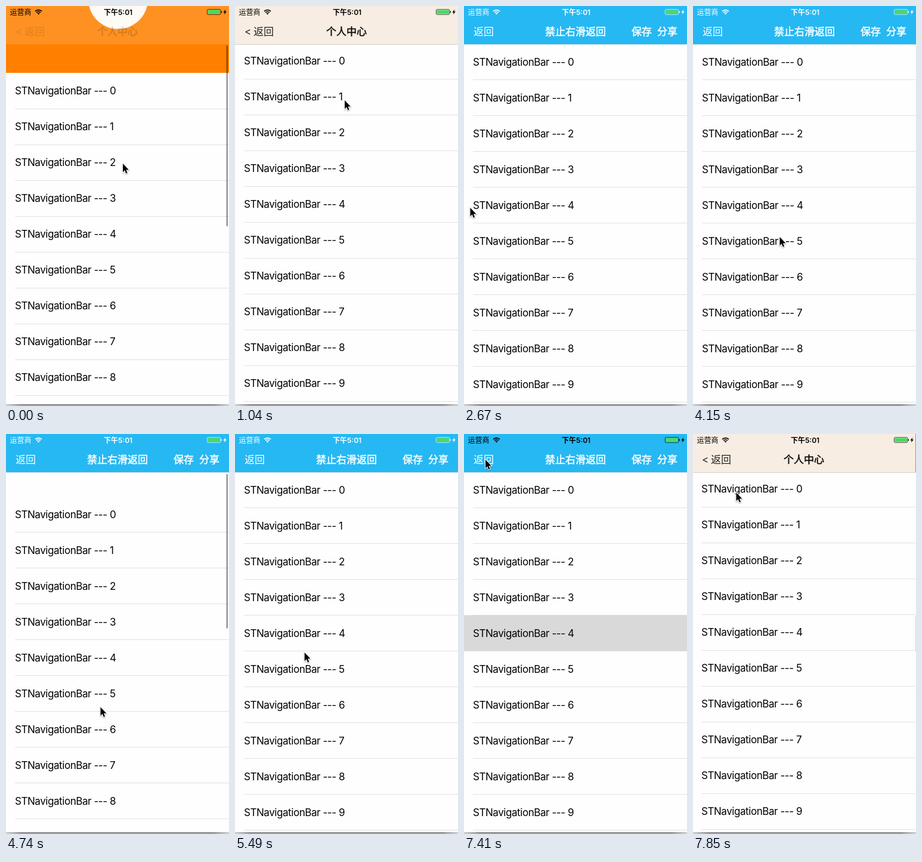
These frames come from a looping animation (374x670 px, 8 s). An HTML page with a canvas:

```html
<!DOCTYPE html>
<html lang="zh-CN">
<head>
<meta charset="utf-8">
<title>Navigation bar demo</title>
<style>
html, body { margin: 0; width: 100%; height: 100%; overflow: hidden; background: #fff; }
canvas { display: block; width: 374px; height: 670px; }
</style>
</head>
<body>
<canvas id="stage"></canvas>
<script>
const W = 374, H = 670, LOOP = 8000, STEPS = 54;
const ORANGE = '#ff8000', BEIGE = '#f7ede2', BLUE = '#26b8f3', PAPER = '#fefefe';
const PUSH = 8, POP = 50, TAP = 40;
const FAMILY = 'Inter, "Noto Sans CJK SC", "Noto Sans CJK", sans-serif';

const canvas = document.getElementById('stage');
const ctx = canvas.getContext('2d');
const dpr = window.devicePixelRatio || 1;
canvas.width = W * dpr;
canvas.height = H * dpr;

// Cursor legs: step of leaving, step of arrival, x, y
const legs = [
  [0, 0, 196, 264], [0, 2, 191, 214], [3, 7, 184, 158], [11, 18, 10.5, 338],
  [19, 28, 145.5, 387], [28, 32, 158.5, 457.5], [33, 39, 102, 334],
  [40, 43, 82.5, 207.5], [43, 44, 38, 118], [45, 46, 38, 79],
  [47, 48, 36, 43], [50, 53, 72.5, 98]
];
const drags = [{ from: 19, to: 24 }, { from: 28, to: 32 }];

const clamp = v => Math.min(1, Math.max(0, v));
const smooth = p => p * p * (3 - 2 * p);

function cursorAt(k) {
  let [, , x, y] = legs[0];
  for (const [leave, arrive, tx, ty] of legs.slice(1)) {
    const p = smooth(clamp((k - leave) / (arrive - leave)));
    x += (tx - x) * p;
    y += (ty - y) * p;
  }
  return { x, y };
}

// The list follows the cursor with resistance, then springs back.
function pullAt(k) {
  const drag = drags.filter(d => k >= d.from).pop();
  if (!drag) return 0;
  const held = Math.min(k, drag.to);
  const reach = 0.585 * (cursorAt(held).y - cursorAt(drag.from).y);
  return reach * Math.exp(-0.9 * (k - held));
}

function rect(x, y, w, h, color) {
  ctx.fillStyle = color;
  ctx.fillRect(x, y, w, h);
}

function text(str, x, y, size, weight, color, spacing = 0) {
  ctx.font = `${weight} ${size}px ${FAMILY}`;
  ctx.letterSpacing = spacing + 'px';
  ctx.fillStyle = color;
  ctx.fillText(str, x, y);
}

// A thin outline gives a medium weight.
function barText(str, x, color, medium) {
  text(str, x, 48.5, 17, 400, color);
  if (!medium) return;
  ctx.strokeStyle = color;
  ctx.lineWidth = 0.5;
  ctx.strokeText(str, x, 48.5);
}

function polygon(points) {
  ctx.beginPath();
  points.forEach(([x, y]) => ctx.lineTo(x, y));
  ctx.closePath();
}

function rows(top, baseline, selected) {
  for (let i = 0; i < 11; i++) {
    const y = Math.round(top) + i * 60;
    rect(15, y + 60, W - 15, 1, '#e1e1e3');
    if (i === selected) rect(0, y + 0.5, W, 60.5, '#d9d9d9');
    text('STNavigationBar --- ' + i, 15, y + baseline, 17, 400, '#000', -0.43);
  }
}

function scrollBar(y, h, alpha) {
  ctx.fillStyle = `rgba(0,0,0,${0.42 * clamp(alpha)})`;
  ctx.beginPath();
  ctx.roundRect(369.5, y, 2.6, h, 1.3);
  ctx.fill();
}

function profilePage(k) {
  const top = Math.max(62, cursorAt(k).y - 152);
  const scrolled = clamp((112 - top) / 50);
  rect(0, 0, W, H, PAPER);
  rows(top, 36, k >= PUSH && k < POP ? 1 : -1);
  rect(0, 0, W, top, ORANGE);
  ctx.fillStyle = '#fffdf8';
  ctx.beginPath();
  ctx.arc(188, top - 123.5, 50, 0, Math.PI * 2);
  ctx.fill();

  ctx.save();
  ctx.globalAlpha = 0.15 + 0.85 * scrolled;
  rect(0, 0, W, 64, BEIGE);
  if (scrolled === 1) rect(0, 64, W, 1, '#d6d0ca');
  barText('<', 16, '#222');
  barText('返回', 31, '#222');
  barText('个人中心', 153, '#111', true);
  ctx.restore();
  scrollBar(66 + scrolled * 25, 303, (5 - k) / 2);
}

function detailPage(k) {
  const pull = pullAt(k);
  rect(0, 0, W, H, PAPER);
  rows(63 + pull, 37, k >= TAP ? 4 : -1);
  rect(0, 0, W, 64, BLUE);
  rect(0, 64, W, 1, '#d5dde1');
  barText('返回', 16, '#fff');
  barText('禁止右滑返回', 136, '#fff', true);
  barText('保存', 281, '#fff', true);
  barText('分享', 324, '#fff', true);
  scrollBar(67, 300 - pull, (pull - 1) / 4);
}

function page(draw, k, x) {
  ctx.save();
  ctx.translate(x, 0);
  draw(k);
  ctx.restore();
}

function pages(k) {
  // Share of the stage that the upper page leaves free.
  const since = start => Math.exp(-13 * (k - start) * LOOP / STEPS / 1000);
  const free = k < PUSH ? 1 : k < POP ? since(PUSH) : 1 - since(POP);
  const x = Math.round(W * free);
  if (x > 0) {
    page(profilePage, k, Math.floor(-112 * (1 - free)));
    rect(0, 0, W, H, `rgba(0,0,0,${0.1 * (1 - free)})`);
    const shade = ctx.createLinearGradient(x - 9, 0, x, 0);
    shade.addColorStop(0, 'rgba(0,0,0,0)');
    shade.addColorStop(1, `rgba(0,0,0,${0.16 * (1 - free)})`);
    rect(x - 9, 0, 9, H, shade);
  }
  if (x < W) page(detailPage, k, x);
}

function statusBar(color) {
  text('运营商', 6.5, 14.5, 12, 400, color);
  text('下午5:01', 164, 14.5, 12, 600, color);

  ctx.strokeStyle = color;
  ctx.lineWidth = 1.7;
  const a = -Math.PI * 0.75, b = -Math.PI * 0.25;
  for (const r of [4.7, 7.8]) {
    ctx.beginPath();
    ctx.arc(54.5, 14.4, r, a, b);
    ctx.stroke();
  }
  ctx.beginPath();
  ctx.moveTo(54.5, 14.6);
  ctx.arc(54.5, 14.4, 2.7, a, b);
  ctx.fill();

  ctx.lineWidth = 0.7;
  ctx.beginPath();
  ctx.roundRect(337.3, 5.7, 22.6, 8.6, 1.8);
  ctx.stroke();
  rect(338.3, 6.7, 20.6, 6.6, '#4cd964');
  rect(360.5, 8.5, 1.3, 3, color);
  ctx.fillStyle = color;
  polygon([[368.5, 5.5], [364.3, 10.7], [366.8, 10.7], [365.6, 14.5], [370, 9.2], [367.4, 9.2]]);
  ctx.fill();
}

function windowEdge() {
  const edge = ctx.createLinearGradient(0, 667, 0, 670);
  edge.addColorStop(0, '#757575');
  edge.addColorStop(1, '#b4b4b4');
  rect(0, 667, W, 3, edge);
  const side = ctx.createLinearGradient(0, 0, W, 0);
  for (const [at, alpha] of [[0, 0.55], [0.07, 0], [0.93, 0], [1, 0.55]]) {
    side.addColorStop(at, `rgba(255,255,255,${alpha})`);
  }
  rect(0, 667, W, 3, side);
}

function drawCursor({ x, y }) {
  ctx.save();
  ctx.translate(x, y);
  polygon([[0, 0], [0, 14.2], [3.2, 11.2], [5.4, 16.4], [7.6, 15.5], [5.4, 10.4], [9.8, 10.2]]);
  ctx.shadowColor = 'rgba(0,0,0,.35)';
  ctx.shadowBlur = 2 * dpr;
  ctx.shadowOffsetY = dpr;
  ctx.strokeStyle = '#fff';
  ctx.lineWidth = 2;
  ctx.stroke();
  ctx.shadowColor = 'transparent';
  ctx.fillStyle = '#000';
  ctx.fill();
  ctx.restore();
}

function draw(ms) {
  const k = Math.floor(((ms + 5) % LOOP) * STEPS / LOOP);
  ctx.setTransform(dpr, 0, 0, dpr, 0, 0);
  pages(k);
  statusBar(k >= PUSH && k < POP ? '#fff' : '#000');
  windowEdge();
  drawCursor(cursorAt(k));
}

const start = performance.now();
function tick() {
  draw((performance.now() - start) % LOOP);
  requestAnimationFrame(tick);
}
tick();
</script>
</body>
</html>
```
